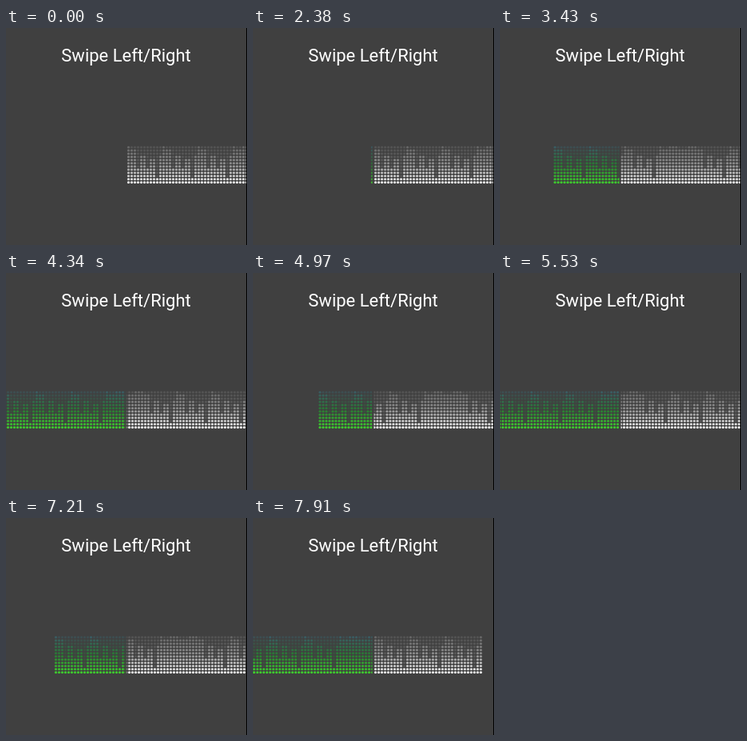
Animation of 302x272 px, one loop 8000 ms. Source, as an HTML page with a canvas:

```html
<!DOCTYPE html>
<html lang="en">
<head>
<meta charset="utf-8">
<title>Waveform swipe</title>
<style>
  html, body { margin: 0; width: 100%; height: 100%; overflow: hidden; background: #404040; }
  #stage { position: relative; width: 302px; height: 272px; overflow: hidden; background: #404040; }
  h1 {
    position: absolute; left: 0; top: 21px; width: 301px; margin: 0;
    font: 400 22px/28px Roboto, sans-serif; color: #fff; text-align: center; white-space: nowrap;
  }
  canvas { position: absolute; left: 0; top: 0; }
  .edge { position: absolute; right: 0; top: 0; width: 1px; height: 100%; background: #000; }
</style>
</head>
<body>
<div id="stage">
  <h1>Swipe Left/Right</h1>
  <canvas id="wave" width="302" height="272"></canvas>
  <div class="edge"></div>
</div>
<script>
const LOOP = 8000, STEP = 70;
const W = 302, H = 272, PITCH = 4, ROWS = 12, COLS = 78, BOTTOM = 193.5, MARK = 150.5;

// Bars of 11 columns: three tall, then shorter ones with a notch every third
// and a deep notch near the end. Every fourth bar is tall throughout.
function level(col) {
  const i = col % 11, jitter = col * 7 % 11 % 2;
  if (i < 3 || col % 44 >= 33) return ROWS - jitter;
  if (i === 9) return 2;
  return i % 3 ? 9 - jitter : 5;
}

// Left edge of the waveform at the turns of the drag: [time, x].
const DRAG = [
  [0, 152], [2310, 152], [3150, 105], [3500, 58], [3640, 49], [3710, 49],
  [4200, -15], [4340, -7], [4960, 84], [5530, -6], [5740, -6],
  [6020, -35], [6580, -35], [7070, 78], [7910, -24], [LOOP, -24]
];

function leftAt(t) {
  const i = DRAG.findIndex(([end]) => t < end);
  const [t0, x0] = DRAG[i - 1], [t1, x1] = DRAG[i];
  return x0 + (x1 - x0) * (t - t0) / (t1 - t0);
}

const BACK = [64, 64, 64];
const mix = (a, b, k) => a.map((n, i) => n + (b[i] - n) * k);
const rgb = c => `rgb(${c.map(Math.round).join()})`;

// Dot colours from the bottom row up, for lit and unlit dots.
function ramp(low, mid, high) {
  return Array.from({ length: ROWS }, (_, r) => {
    const k = r / (ROWS - 1);
    const lit = k < .5 ? mix(low, mid, k * 2) : mix(mid, high, k * 2 - 1);
    return { lit: rgb(lit), dim: rgb(mix(BACK, lit, .1 + .4 * k)) };
  });
}

const PLAYED = ramp([62, 204, 46], [42, 122, 52], [58, 92, 98]);
const AHEAD = ramp([240, 240, 240], [144, 144, 144], [102, 102, 102]);

const ctx = document.getElementById('wave').getContext('2d');

function drawSide(from, to, left, colors) {
  ctx.save();
  ctx.beginPath();
  ctx.rect(from, 0, to - from, H);
  ctx.clip();
  for (let col = 0; col < COLS; col++) {
    const x = left + col * PITCH + 1.5;
    const tall = level(col);
    for (let row = 0; row < ROWS; row++) {
      ctx.fillStyle = row < tall ? colors[row].lit : colors[row].dim;
      ctx.beginPath();
      ctx.arc(x, BOTTOM - row * PITCH, 1.6, 0, Math.PI * 2);
      ctx.fill();
    }
  }
  ctx.restore();
}

function draw(now) {
  const left = leftAt(Math.floor(now % LOOP / STEP) * STEP);
  ctx.clearRect(0, 0, W, H);
  drawSide(0, MARK - 1, left, PLAYED);
  drawSide(MARK + 1, W, left, AHEAD);
}

const start = performance.now();
function tick() {
  draw(performance.now() - start);
  requestAnimationFrame(tick);
}
tick();
</script>
</body>
</html>
```
